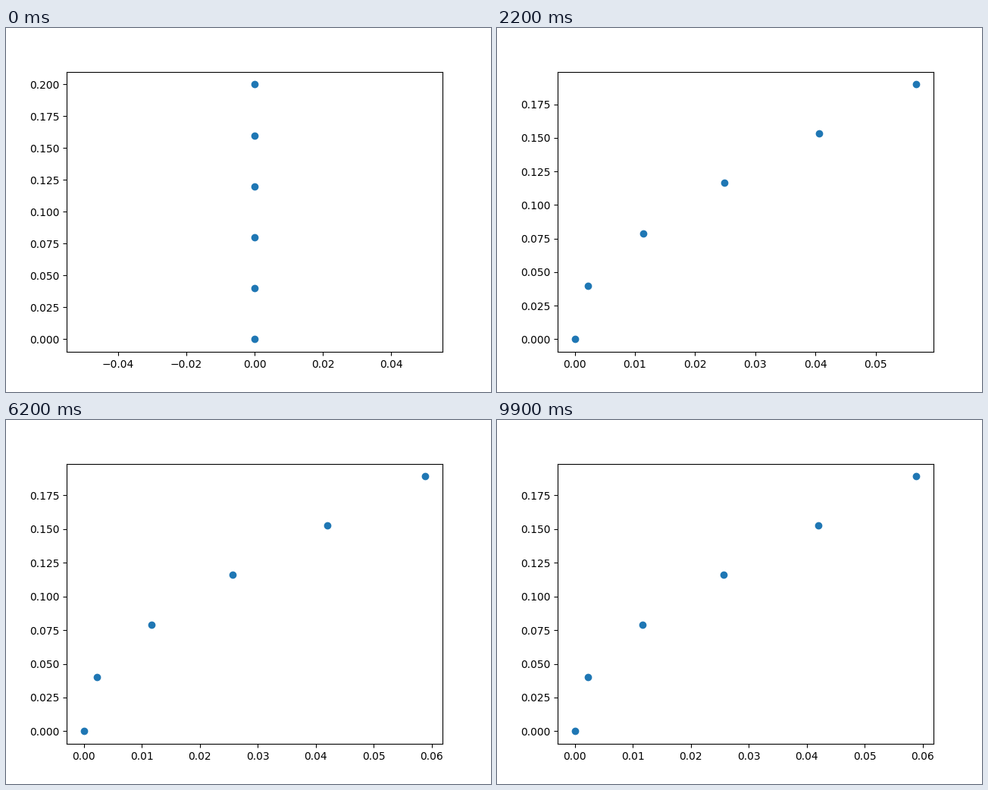
Animation, 640 px wide and 480 px high, one loop 10 s. Source, as a matplotlib script:

```python
import numpy as np
import matplotlib.pyplot as plt
from matplotlib.animation import FuncAnimation

FRAMES = 100
INTERVAL = 100  # ms
LINKS = 5
LINK_LENGTH = 0.04
ROOT_ANGLE = 0.0585  # settled lean of the lowest link, radians
CURL = 0.38          # further lean gained by the top link


def rod(bend):
    """Node positions for a bend from 0 (straight) to 1 (settled)."""
    along = np.linspace(0, 1, LINKS)
    # The free end lags, so the curve sits nearer the root early on
    power = 2.2 + 2.2 * (1 - bend)
    angles = bend * (ROOT_ANGLE + CURL * (1 - (1 - along) ** power))
    x = np.append(0, np.cumsum(LINK_LENGTH * np.sin(angles)))
    y = np.append(0, np.cumsum(LINK_LENGTH * np.cos(angles)))
    return x, y


def rise(t, rate):
    return 1 - np.exp(-rate * t)


def dip(t, centre, depth):
    return depth * np.exp(-((t - centre) / 0.35) ** 2)


def tip_offset(t):
    """Fast swing, slow settling, then a few growing sways back."""
    settled = 0.03745 * rise(t, 7) + 0.0215 * rise(t, 1.04)
    sway = dip(t, 3.9, 0.0002) + dip(t, 7.0, 0.0005) + dip(t, 9.15, 0.0009)
    return settled - sway


BENDS = np.linspace(0, 1.05, 400)
TIPS = [rod(bend)[0][-1] for bend in BENDS]


def draw(frame):
    tip = tip_offset(frame * INTERVAL / 1000)
    ax.clear()
    ax.scatter(*rod(np.interp(tip, TIPS, BENDS)))


fig, ax = plt.subplots(figsize=(6.4, 4.8), dpi=100)
anim = FuncAnimation(fig, draw, frames=FRAMES, interval=INTERVAL,
                     repeat=True, repeat_delay=0)
plt.show()
```
